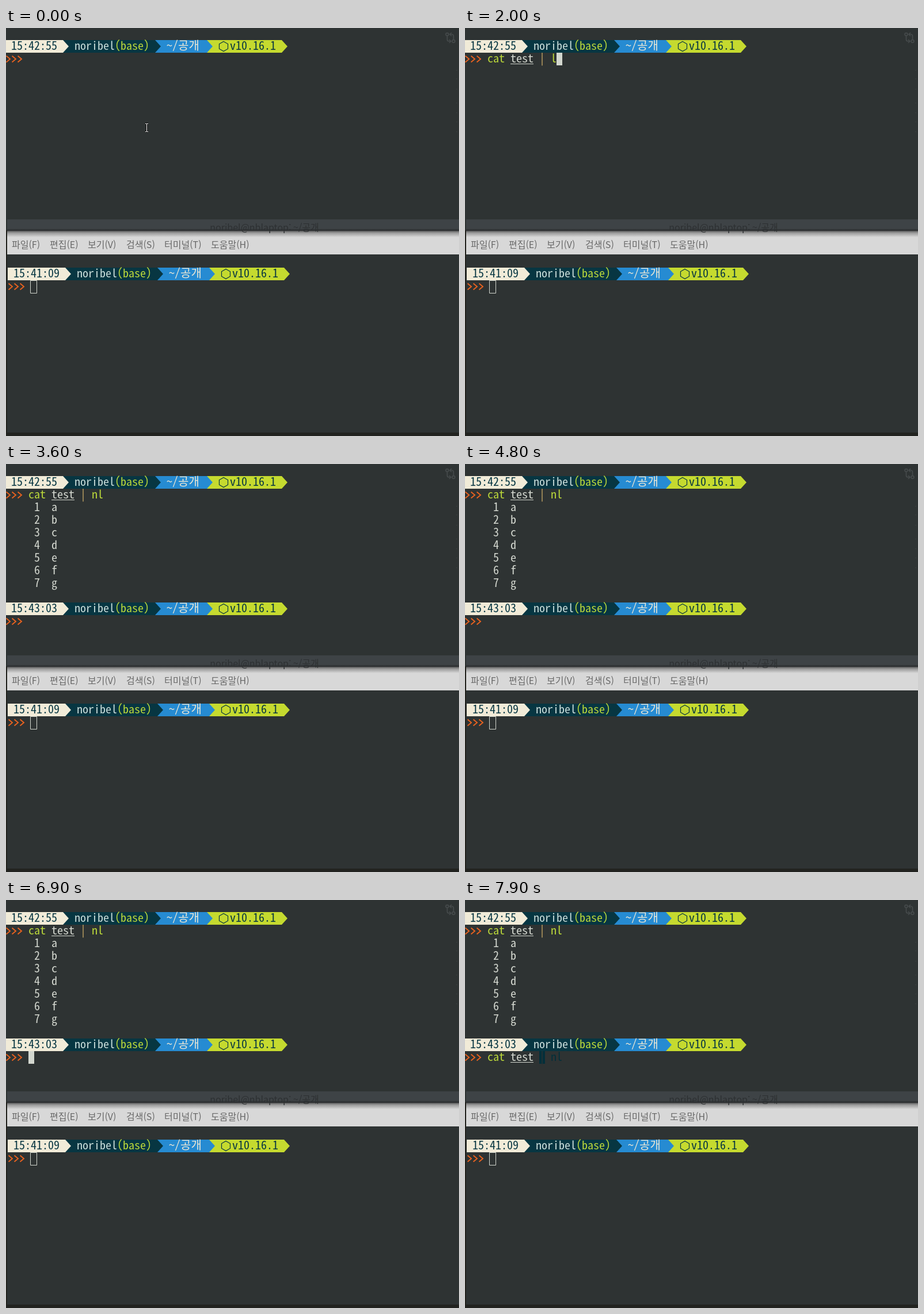
Recreate the animation shown at these times as an HTML page with a canvas. Size 787 by 710 pixels, loop 8 s.

```html
<!DOCTYPE html>
<html lang="ko">
<head>
<meta charset="utf-8">
<title>Terminal session</title>
<style>
  html, body { margin: 0; width: 100%; height: 100%; overflow: hidden; background: #2e3333; }
  canvas { display: block; }
</style>
</head>
<body>
<canvas id="stage" width="787" height="710"></canvas>
<script>
const ctx = document.getElementById('stage').getContext('2d');
const MONO = '20px "Noto Sans Mono CJK KR", "Noto Sans Mono", monospace';
const SANS = '300 16px "Noto Sans CJK KR", "Noto Sans", sans-serif';
const LOOP = 8000, CELL = 10, LINE = 22, LEFT = -1, TOP = 21;
const USER = 'noribel', HOST = 'nblaptop';
const color = {
  back: '#2e3333', text: '#d3d7cf', cream: '#f1ebd8', navy: '#073642', blue: '#268bd2',
  lime: '#c5da2f', green: '#bad73a', orange: '#e9621f', red: '#dc322f', pipe: '#cfae68', hint: '#042f3a'
};

const HISTORY = ['cat test | nl', 'tail -F aa'];
const COMMANDS = ['cat', 'tail', 'l', 'nl'];

// Each entry: start time, typed text, cursor visible, optional leftover suggestion.
const firstLine = [
  [0, '', false],
  ...[...'cat test '].map((_, i) => [300 + i * 100, 'cat test '.slice(0, i + 1), true]),
  [1400, 'cat test |', true], [1800, 'cat test | ', true], [2000, 'cat test | l', true],
  [2600, 'cat test | ', true], [2700, 'cat test | n', true], [2800, 'cat test | nl', true],
  [3000, 'cat test | nl', false]
];
const secondLine = [
  [3000, '', true], [3600, '', false], [4200, '', true], [4800, '', false], [5400, '', true],
  [5500, 'ta', true], [5700, 'tail', true], [6200, 'tail', false],
  [6400, 'tai', true], [6500, 'ta', true], [6600, 't', true], [6700, '', true, 'tail -F aa'],
  [6900, '', true], [7000, 'c', true], [7100, 'ca', true], [7300, 'cat', true],
  [7500, 'cat t', true], [7600, 'cat te', true], [7700, 'cat tes', true],
  [7800, 'cat test', true], [7900, 'cat test ', true]
];

function rect(x, y, w, h, fill) {
  ctx.fillStyle = fill;
  ctx.fillRect(x, y, w, h);
}

function text(str, x, baseline, fill, font = MONO) {
  ctx.font = font;
  ctx.fillStyle = fill;
  ctx.fillText(str, x, baseline);
}

function stroke(path, style, width) {
  ctx.strokeStyle = style;
  ctx.lineWidth = width;
  ctx.stroke(new Path2D(path));
}

function segment(x, y, cells, fill) {
  rect(x, y, cells * CELL, LINE, fill);
}

function arrow(x, y, fill) {
  ctx.fillStyle = fill;
  ctx.fill(new Path2D(`M${x} ${y}l10 11l-10 11z`));
}

function prompt(x, y, time) {
  const base = y + 17, at = col => x + col * CELL;
  segment(x, y, 10, color.cream);
  segment(at(10), y, 16, color.navy);
  segment(at(26), y, 9, color.blue);
  segment(at(35), y, 13, color.lime);
  arrow(at(10), y, color.cream);
  arrow(at(26), y, color.navy);
  arrow(at(35), y, color.blue);
  arrow(at(48), y, color.lime);
  text(time, at(1), base, color.navy);
  text(USER, at(12), base, '#c9dcd9');
  text('(base)', at(19), base, color.green);
  text('~/공개', at(28), base, '#eee8d5');
  text('v10.16.1', at(39), base, color.navy);
  stroke(`M${at(37) + 9} ${y + 2.5}l7.5 4.3v8.4l-7.5 4.3l-7.5 -4.3v-8.4z`, color.navy, 1.2);
  for (let i = 0; i < 3; i++) {
    stroke(`M${at(i) + 1.5} ${y + 27.5}l6.5 5.5l-6.5 5.5`, color.orange, 1.9);
  }
}

function commandLine(y, [, typed, cursorOn, leftover]) {
  const at = col => LEFT + (4 + col) * CELL, base = y + 17;
  let expectCommand = true;
  for (const { 0: word, index } of typed.matchAll(/\S+/g)) {
    let fill = color.text;
    if (word === '|') fill = color.pipe;
    else if (expectCommand) fill = COMMANDS.includes(word) ? color.green : color.red;
    else rect(at(index), base + 2, word.length * CELL, 1, color.text);
    text(word, at(index), base, fill);
    expectCommand = word === '|';
  }
  const full = leftover || (typed && HISTORY.find(line => line.startsWith(typed))) || '';
  const hint = full.slice(typed.length), end = typed.length;
  text(hint, at(end), base, color.hint);
  if (cursorOn) {
    rect(at(end), y, CELL, LINE, hint ? color.hint : color.text);
    text(hint.slice(0, 1), at(end), base, color.back);
  }
}

function stateAt(line, time) {
  return line.findLast(([start]) => start <= time);
}

function topTerminal(time) {
  prompt(LEFT, TOP, '15:42:55');
  commandLine(TOP + LINE, stateAt(firstLine, time));
  if (time >= 3000) {
    [...'abcdefg'].forEach((letter, i) => {
      const base = TOP + (i + 2) * LINE + 17;
      text(String(i + 1), LEFT + 5 * CELL, base, color.text);
      text(letter, LEFT + 8 * CELL, base, color.text);
    });
    prompt(LEFT, TOP + 10 * LINE, '15:43:03');
    commandLine(TOP + 11 * LINE, stateAt(secondLine, time));
  }
  if (time < 300) {
    const beam = 'M242 166.5h2l.5 .5l.5 -.5h2M244.5 167v13M242 180.5h2l.5 -.5l.5 .5h2';
    stroke(beam, '#111', 3);
    stroke(beam, '#fff', 1);
  }
}

function faintDetails() {
  const faint = '#454a4b';
  stroke('M766.5 13v7q0 3 3 3h3M770 20l3 3l-3 3M777.5 21v-7q0 -3 -3 -3h-3M774 8l-3 3l3 3', faint, 1.7);
  for (const [x, y] of [[766.5, 11], [777.5, 23]]) {
    ctx.beginPath();
    ctx.arc(x, y, 2.4, 0, Math.PI * 2);
    ctx.fillStyle = color.back;
    ctx.fill();
    ctx.stroke();
  }
  for (const y of [73, 88, 106, 130, 147, 163, 180]) rect(782, y, 2, 1, '#3a3f3f');
}

function bottomWindow() {
  rect(0, 352, 2, 358, '#23231f');
  rect(0, 704, 787, 6, '#222320');
  rect(2, 333, 785, 20, '#3e4346');
  rect(2, 353, 785, 41, '#d8d8d8');
  const shade = ctx.createLinearGradient(0, 349, 0, 364);
  shade.addColorStop(0, 'rgba(40,42,43,0)');
  shade.addColorStop(0.2, 'rgba(40,42,43,.85)');
  shade.addColorStop(0.5, 'rgba(60,60,60,.4)');
  shade.addColorStop(1, 'rgba(60,60,60,0)');
  rect(2, 349, 785, 15, shade);
  ctx.textAlign = 'center';
  text(`${USER}@${HOST}: ~/공개`, 449, 353, '#2d3032', SANS);
  ctx.textAlign = 'left';
  const menu = { '파일(F)': 10, '편집(E)': 76, '보기(V)': 142, '검색(S)': 209, '터미널(T)': 275, '도움말(H)': 356 };
  for (const label in menu) text(label, menu[label], 383, '#686868', SANS);
  prompt(3, 417, '15:41:09');
  stroke('M42.5 439.5h11v22h-11z', color.text, 1);
}

function draw(now) {
  rect(0, 0, 787, 710, color.back);
  faintDetails();
  topTerminal(now % LOOP);
  bottomWindow();
}

const start = performance.now();
function tick() {
  draw(performance.now() - start);
  requestAnimationFrame(tick);
}
tick();
</script>
</body>
</html>
```
